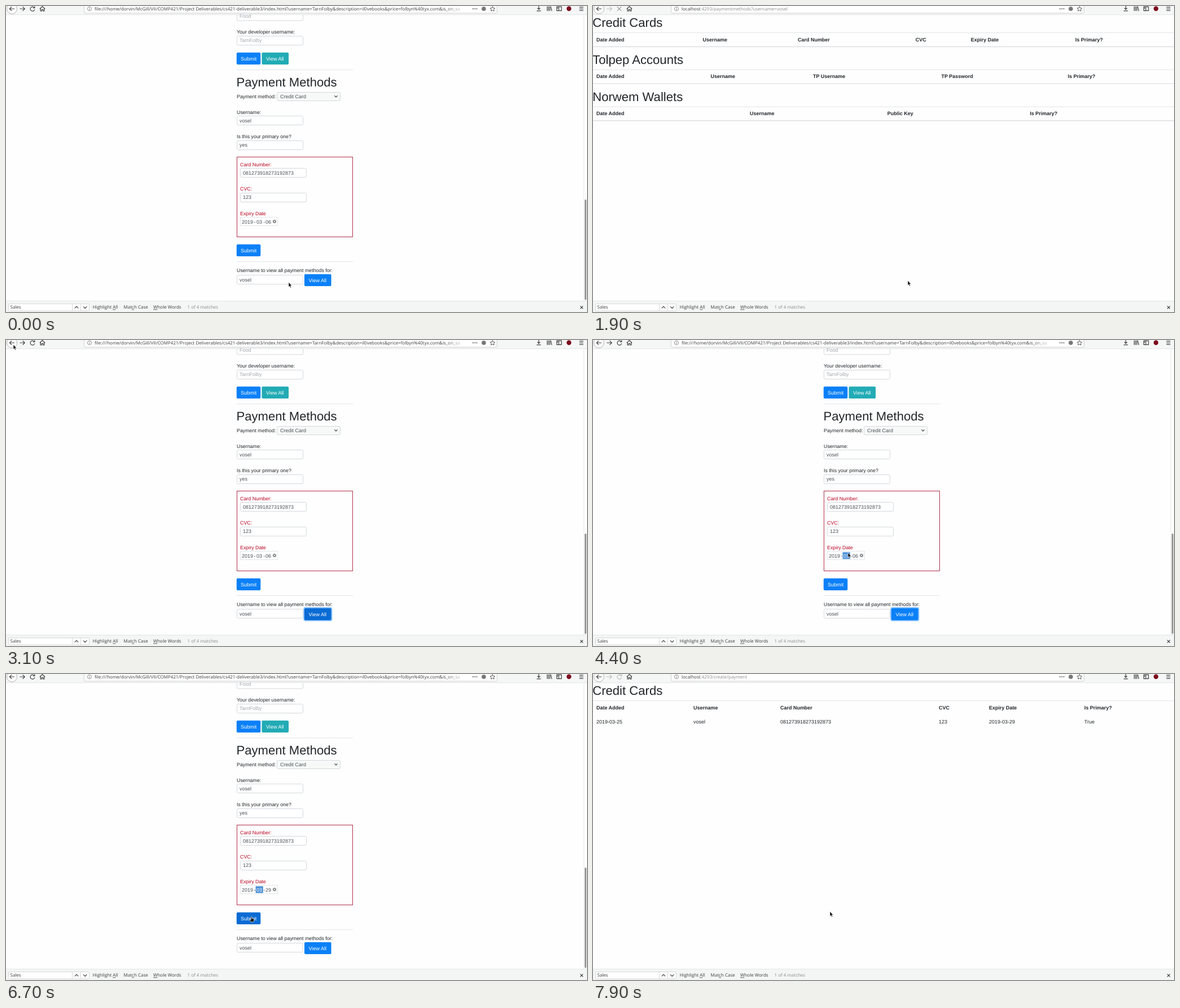
An HTML page that plays this animation: 1030 px wide and 544 px high, repeating every 8 s.

```html
<!DOCTYPE html>
<html lang="en">
<head>
<meta charset="utf-8">
<title>Payment methods</title>
<style>
html, body { margin: 0; width: 100%; height: 100%; overflow: hidden; background: #fefefe; }
svg { display: block; font-family: "Liberation Sans", Arial, sans-serif; text-rendering: geometricPrecision; }
text { font-size: 8.85px; fill: #212529; white-space: pre; }
.h1 { font-size: 22.1px; }
.val text { font-size: 9px; fill: #495057; }
.val .dim { fill: #a3a8ad; }
.btn { font-size: 9.05px; fill: #fff; }
.red text { fill: #b8001f; }
.th text { font-size: 8.97px; font-weight: bold; }
.td text { font-size: 9px; }
.ui text { font: 8px "Open Sans", "Noto Sans", sans-serif; fill: #3c3c3c; }
.ui .soft { fill: #8b8b8b; }
.u { text-decoration: underline; }
.field rect { fill: #fff; stroke: #d3d8dd; rx: 2px; }
.line { stroke: #e3e5e7; }
.bold { stroke: #d5d9dc; stroke-width: 1.2; }
.icon { fill: none; stroke: #3f3f40; stroke-width: 1.2; }
.pale { stroke: #bcbcbc; }
.cal text { font: 6.25px "Open Sans", "Noto Sans", sans-serif; text-anchor: middle; fill: #2e3436; }
.cal .month { font-size: 7px; }
.cal .name { fill: #8d8d8d; }
.cal .end { fill: #b5121f; }
.cal .out { fill: #a3a3a3; }
.cal .end.out { fill: #b39a9a; }
.cal .end.name { fill: #c07c80; }
.cal .today { font-weight: bold; }

.run, .cal .old, .cal .new { animation: 8s step-end infinite; }
.form { animation-name: form; }
.list { animation-name: list; }
.result { animation-name: result; }
.ready { animation-name: ready; }
.stop { animation-name: stop; }
.idle { animation-name: idle; }
.view { animation-name: view; }
.view-ring { animation-name: view-ring; }
.send { animation-name: send; }
.send-ring { animation-name: send-ring; }
.marked { animation-name: marked; }
.day-a { animation-name: day-a; }
.day-b { animation-name: day-b; }
.cal { animation-name: cal; }
.pick { animation-name: pick; }
.cal .old { animation-name: old; }
.cal .new { animation-name: new; }
.arrow { animation-name: arrow; }
.hand { animation-name: hand; }
.cursor { animation-name: cursor; }

@keyframes form { 0%, 37.5% { visibility: visible } 22.5%, 92.5%, 100% { visibility: hidden } }
@keyframes list { 0%, 37.5%, 100% { visibility: hidden } 22.5% { visibility: visible } }
@keyframes result { 0%, 100% { visibility: hidden } 92.5% { visibility: visible } }
@keyframes ready { 0%, 33.75% { visibility: visible } 21.25%, 90%, 100% { visibility: hidden } }
@keyframes stop { 0%, 26.25%, 93.75%, 100% { visibility: hidden } 21.25%, 90% { visibility: visible } }
@keyframes idle { 0%, 33.75% { visibility: hidden } 26.25%, 93.75%, 100% { visibility: visible } }
@keyframes view { 0%, 40%, 100% { fill: #0b80f7 } 17.5% { fill: #0a6bd4 } }
@keyframes view-ring { 0%, 56.25%, 100% { opacity: 0 } 21.25% { opacity: 1 } }
@keyframes send { 0%, 100% { fill: #0b80f7 } 83.75% { fill: #0a6bd4 } }
@keyframes send-ring { 0%, 100% { opacity: 0 } 90% { opacity: 1 } }
@keyframes marked { 0%, 100% { opacity: 0 } 55% { opacity: 1 } }
@keyframes day-a { 0% { opacity: 1 } 78.75%, 100% { opacity: 0 } }
@keyframes day-b { 0% { opacity: 0 } 78.75%, 100% { opacity: 1 } }
@keyframes cal { 0%, 78.75%, 100% { visibility: hidden } 56.25% { visibility: visible } }
@keyframes pick { 0% { transform: translate(479.2px, 448.4px) } 73.75%, 100% { transform: translate(515.9px, 490px) } }
@keyframes old { 0% { fill: #fff } 73.75%, 100% { fill: #2e3436 } }
@keyframes new { 0% { fill: #2e3436 } 73.75%, 100% { fill: #fff } }
@keyframes arrow { 0%, 22.5%, 92.5%, 100% { visibility: visible } 17.5%, 83.75% { visibility: hidden } }
@keyframes hand { 0%, 22.5%, 92.5%, 100% { visibility: hidden } 17.5%, 83.75% { visibility: visible } }
@keyframes cursor {
  0% { transform: translate(501px, 491px) }
  2.5% { transform: translate(494px, 407px) }
  6.25% { transform: translate(472px, 362px) }
  7.5% { transform: translate(440px, 304px) }
  8.75% { transform: translate(412px, 256px) }
  10% { transform: translate(421px, 235px) }
  11.25% { transform: translate(452px, 262px) }
  12.5% { transform: translate(500px, 330px) }
  13.75% { transform: translate(545px, 400px) }
  15% { transform: translate(575px, 450px) }
  16.25% { transform: translate(560px, 473px) }
  17.5% { transform: translate(558px, 488px) }
  25% { transform: translate(545px, 470px) }
  26.25% { transform: translate(470px, 380px) }
  27.5% { transform: translate(340px, 240px) }
  28.75% { transform: translate(190px, 120px) }
  30% { transform: translate(90px, 45px) }
  31.25% { transform: translate(44px, 18px) }
  32.5% { transform: translate(34px, 14px) }
  33.75% { transform: translate(25px, 10px) }
  36.25% { transform: translate(13px, 8px) }
  40% { transform: translate(190px, 130px) }
  41.25% { transform: translate(401px, 271px) }
  45% { transform: translate(470px, 310px) }
  46.25% { transform: translate(526px, 345px) }
  47.5% { transform: translate(490px, 362px) }
  48.75% { transform: translate(440px, 321px) }
  51.25% { transform: translate(450px, 368px) }
  53.75% { transform: translate(452px, 378px) }
  62.5% { transform: translate(461px, 398px) }
  63.75% { transform: translate(482px, 430px) }
  65% { transform: translate(508px, 464px) }
  66.25% { transform: translate(530px, 490px) }
  67.5% { transform: translate(544px, 506px) }
  68.75% { transform: translate(530px, 508px) }
  71.25% { transform: translate(527px, 500px) }
  81.25% { transform: translate(500px, 480px) }
  82.5% { transform: translate(455px, 447px) }
  83.75% { transform: translate(435px, 431px) }
  87.5% { transform: translate(433px, 436px) }
  93.75% { transform: translate(431px, 433px) }
  95% { transform: translate(428px, 429px) }
  96.25% { transform: translate(425px, 426px) }
  97.5% { transform: translate(422px, 424px) }
  98.75%, 100% { transform: translate(420px, 422px) }
}
</style>
</head>
<body>
<svg width="1030" height="544" viewBox="0 0 1030 544">
  <defs>
    <linearGradient id="fade"><stop offset="0" stop-color="#fff" stop-opacity="0"/><stop offset=".8" stop-color="#fff"/></linearGradient>
    <path id="reload" d="M50 2.8A3.9 3.9 0 1 0 50.8 6M50.8 .6V3.5H47.8"/>
    <path id="forward" d="M24.5 5H33M29.6 1.4 33.2 5 29.6 8.6"/>
  </defs>
  <rect width="1030" height="544" fill="#fefefe"/>

  <!-- browser toolbar -->
  <g class="ui">
    <rect width="1030" height="15" fill="#f5f6f6"/>
    <path class="line" d="M0 15.5H1030"/>
    <circle cx="10.5" cy="5" r="9" fill="#fcfcfc" stroke="#b4b4b4"/>
    <rect x="138.5" y="-5" width="732" height="17.8" rx="2" fill="#fff" stroke="#cfd0d1"/>
    <g class="icon">
      <path d="M15 5H6.5M10 1.4 6.4 5 10 8.6"/>
      <path d="M59.8 5 64.5 .8 69.2 5M61.2 4.5V9H63.3V6.3H65.7V9H67.8V4.5"/>
      <path d="M944.5 0V6M942 3.8 944.5 6.2 947 3.8M940.8 8.6H948.2"/>
      <path d="M959.5 .8V8.8M961.8 .8V8.8M964.1 .8V8.8M965.6 1 967.6 8.8"/>
      <path d="M976.5 1.3H984.7V8.4H976.5ZM980 1.3V8.4M977 3.6H979"/>
      <path d="M1016.5 2.2H1023.5M1016.5 5H1023.5M1016.5 7.8H1023.5"/>
      <path d="M862.5 .8 863.8 3.6 866.8 4 864.6 6.1 865.2 9 862.5 7.6 859.8 9 860.4 6.1 858.2 4 861.2 3.6Z" stroke-width=".9"/>
    </g>
    <circle cx="847" cy="5" r="3.8" fill="#777"/>
    <circle cx="998" cy="4.8" r="4.2" fill="#7d0b1c"/>
    <g fill="#666"><circle cx="828" cy="5" r="1.1"/><circle cx="831.3" cy="5" r="1.1"/><circle cx="834.6" cy="5" r="1.1"/></g>
    <circle cx="148" cy="5" r="3.6" fill="none" stroke="#777" stroke-width=".8"/>
    <path d="M148 4.3V7.2M148 2.6V3.5" stroke="#777"/>
    <use href="#reload" class="icon run ready"/>
    <path class="icon run stop" d="M43 1.3 50.2 8.7M50.2 1.3 43 8.7" style="stroke:#999"/>
    <use href="#reload" class="icon pale run idle"/>
  </g>

  <g class="run form">
    <use href="#forward" class="icon"/>
    <g class="ui">
      <text x="157" y="8">file:///home/dorvin/McGill/VII/COMP421/Project Deliverables/cs421-deliverable3/index.html?username=TarnFolby&amp;description=il0vebooks&amp;price=folbyn%40tyx.com&amp;is_on_sa</text>
      <rect x="780" y="0" width="42" height="12" fill="url(#fade)"/>
    </g>
    <g class="field">
      <path d="M409.5 16V24Q409.5 25.9 411.4 25.9H524.6Q526.5 25.9 526.5 24V16" fill="#fff" stroke="#d3d8dd"/>
      <rect x="409.5" y="53.5" width="117" height="16"/>
      <rect x="480.5" y="153.5" width="112" height="15" style="fill:#f6f9f7"/>
      <rect x="409.5" y="195.5" width="117" height="16"/>
      <rect x="409.5" y="239.5" width="117" height="16"/>
      <rect x="415.5" y="288.5" width="117" height="16"/>
      <rect x="415.5" y="332.5" width="117" height="16"/>
      <rect x="415.5" y="375.5" width="66" height="15" style="stroke:#e2e4e6;rx:0"/>
      <rect x="409.5" y="478.5" width="117" height="16"/>
    </g>
    <path class="icon" d="M582.4 159.3 585 162 587.6 159.3"/>
    <path class="line" d="M409 113.5H615M409 454.5H615"/>
    <rect x="409.5" y="268.5" width="205" height="142" fill="none" stroke="#b0304a"/>

    <text x="409" y="49.4">Your developer username:</text>
    <text class="h1" x="408.5" y="143">Payment Methods</text>
    <text x="409" y="164">Payment method:</text>
    <text x="409" y="192">Username:</text>
    <text x="409" y="235.4">Is this your primary one?</text>
    <text x="409" y="473.2">Username to view all payment methods for:</text>
    <g class="red">
      <text x="415" y="285">Card Number:</text>
      <text x="415" y="328.4">CVC:</text>
      <text x="415" y="372">Expiry Date</text>
    </g>
    <g class="val">
      <text class="dim" x="414" y="21.2">Food</text>
      <text class="dim" x="414" y="64.4">TarnFolby</text>
      <text x="486" y="164.2">Credit Card</text>
      <text x="414" y="207">vosel</text>
      <text x="414" y="250.4">yes</text>
      <text x="420" y="300">081273918273192873</text>
      <text x="420" y="343.4">123</text>
      <text x="414" y="490.2">vosel</text>
      <text x="418" y="386.5">2019</text>
      <text x="439.5" y="386.5">-</text>
      <text x="444" y="386.5">03</text>
      <text x="456.3" y="386.5">-</text>
      <text class="run day-a" x="460" y="386.5">06</text>
      <text class="run day-b" x="460" y="386.5">29</text>
    </g>
    <g class="run marked">
      <rect x="442.6" y="377.3" width="13.2" height="12" fill="#4a90d9"/>
      <text class="btn" x="444" y="386.5">03</text>
    </g>
    <circle cx="476" cy="383" r="3.1" fill="#858585"/>
    <path d="M474.7 381.7 477.3 384.3M477.3 381.7 474.7 384.3" stroke="#fff" stroke-width=".9"/>

    <g fill="none" stroke="#80bdff" stroke-width="1.8">
      <rect class="run view-ring" x="528.2" y="475.9" width="49.2" height="22.9" rx="2.6"/>
      <rect class="run send-ring" x="408" y="422.9" width="44.1" height="22.9" rx="2.6"/>
    </g>
    <rect x="408.8" y="82.8" width="42.5" height="21.3" rx="2" fill="#0b80f7"/>
    <rect x="453.5" y="82.8" width="47.6" height="21.3" rx="2" fill="#22abb5"/>
    <rect class="run send" x="408.8" y="423.7" width="42.5" height="21.3" rx="2"/>
    <rect class="run view" x="529" y="476.7" width="47.6" height="21.3" rx="2"/>
    <text class="btn" x="416" y="96.8">Submit</text>
    <text class="btn" x="461" y="96.8">View All</text>
    <text class="btn" x="416" y="437.6">Submit</text>
    <text class="btn" x="536.5" y="490.8">View All</text>

    <path d="M1024.5 16V524" stroke="#e9e9e9"/>
    <rect x="1025.8" y="344" width="3.2" height="178.5" rx="1.6" fill="#989898"/>
  </g>

  <g class="run cal">
    <path d="M417 398.5Q417 396.5 419 396.5H422L427 391.8 432 396.5H555.5Q557.5 396.5 557.5 398.5V520.5Q557.5 522.5 555.5 522.5H419Q417 522.5 417 520.5Z" fill="#fff" stroke="#d6d6d6"/>
    <rect x="457.5" y="403.5" width="59" height="12" rx="1.5" fill="#fff" stroke="#d8d8d8"/>
    <path class="icon" style="stroke:#777" d="M433 405.6 429.4 409.2 433 412.8M541.5 405.6 545.1 409.2 541.5 412.8M506.6 408.2 509 410.5 511.4 408.2"/>
    <text class="month" x="483.3" y="411.8">March 2019</text>
    <rect x="442.6" y="490" width="16.4" height="13" rx="1" fill="#d9dadb"/>
    <rect class="run pick" width="16.4" height="13" rx="1" fill="#4a90d9"/>
    <g id="days"></g>
  </g>

  <g class="run list">
    <use href="#forward" class="icon pale"/>
    <g class="ui"><text x="157" y="8">localhost<tspan class="soft">:4293/paymentmethods?username=vosel</tspan></text></g>
    <text class="h1" x="-.8" y="37.4">Credit Cards</text>
    <text class="h1" x="-.8" y="103">Tolpep Accounts</text>
    <text class="h1" x="-.8" y="168.7">Norwem Wallets</text>
    <path class="line" d="M0 47.5H1030M0 113.3H1030M0 179.2H1030"/>
    <path class="bold" d="M0 72.3H1030M0 138H1030M0 203.8H1030"/>
    <g class="th">
      <text x="6" y="63">Date Added</text><text x="194.5" y="63">Username</text><text x="363" y="63">Card Number</text>
      <text x="571.8" y="63">CVC</text><text x="669.8" y="63">Expiry Date</text><text x="855" y="63">Is Primary?</text>
      <text x="6" y="128.4">Date Added</text><text x="208.5" y="128.4">Username</text><text x="390" y="128.4">TP Username</text>
      <text x="617.5" y="128.4">TP Password</text><text x="841.7" y="128.4">Is Primary?</text>
      <text x="6" y="194.4">Date Added</text><text x="278" y="194.4">Username</text><text x="521.8" y="194.4">Public Key</text>
      <text x="774.4" y="194.4">Is Primary?</text>
    </g>
  </g>

  <g class="run result">
    <use href="#forward" class="icon pale"/>
    <g class="ui"><text x="157" y="8">localhost<tspan class="soft">:4293/create/payment</tspan></text></g>
    <text class="h1" x="-.8" y="37.4">Credit Cards</text>
    <path class="line" d="M0 47.5H1030"/>
    <g class="th">
      <text x="6" y="63">Date Added</text><text x="178" y="63">Username</text><text x="332" y="63">Card Number</text>
      <text x="613" y="63">CVC</text><text x="702" y="63">Expiry Date</text><text x="871" y="63">Is Primary?</text>
    </g>
    <g class="td">
      <text x="6" y="88">2019-03-25</text><text x="178" y="88">vosel</text><text x="332" y="88">081273918273192873</text>
      <text x="613" y="88">123</text><text x="702" y="88">2019-03-29</text><text x="871" y="88">True</text>
    </g>
  </g>

  <!-- find bar -->
  <g class="ui">
    <rect y="524.5" width="1030" height="20" fill="#f4f5f5"/>
    <path class="line" d="M0 524.5H1030"/>
    <rect x="4.5" y="529.5" width="143" height="12.5" rx="1.5" fill="#fff" stroke="#d6d7d8"/>
    <path d="M117.5 529.5V542M132.5 529.5V542" stroke="#d6d7d8"/>
    <path class="icon" d="M121.8 537.4 125 534.2 128.2 537.4M137 534.2 140.2 537.4 143.4 534.2M1018 533.3 1023 538.3M1023 533.3 1018 538.3"/>
    <text x="7.5" y="538.4">Sales</text>
    <text x="153.8" y="538.4">Highlight <tspan class="u">A</tspan>ll</text>
    <text x="208.6" y="538.4">Mat<tspan class="u">c</tspan>h Case</text>
    <text x="261" y="538.4"><tspan class="u">W</tspan>hole Words</text>
    <text class="soft" x="321.5" y="538.4">1 of 4 matches</text>
  </g>

  <g class="run cursor" stroke="#fff" stroke-width=".6" fill="#111">
    <path class="run arrow" d="M0 0V8.6L1.9 7 3.2 10 4.6 9.4 3.3 6.4H5.8Z"/>
    <path class="run hand" d="M-.9 .6Q0-.5 .9 .6V3.4L4 4.1Q4.8 4.4 4.8 5.3L4.2 9.8H-.8L-3 6.4Q-3.2 5.3-2.2 5.4L-.9 6.4Z"/>
  </g>
</svg>
<script>
const days = document.getElementById("days");

function put(label, col, y, ...marks) {
  const el = document.createElementNS("http://www.w3.org/2000/svg", "text");
  el.setAttribute("x", 432.3 + col * 18.35);
  el.setAttribute("y", y);
  if (col % 6 === 0) marks.push("end");
  el.setAttribute("class", marks.join(" "));
  el.textContent = label;
  days.append(el);
}

["Sun", "Mon", "Tue", "Wed", "Thu", "Fri", "Sat"].forEach((name, col) => put(name + ".", col, 429.3, "name"));

const special = { 6: "old", 25: "today", 29: "new" };
for (let i = 0; i < 42; i++) {
  const date = new Date(2019, 1, 24 + i);
  const day = date.getDate();
  const mark = date.getMonth() === 2 ? special[day] || "in" : "out";
  put(day, i % 7, 443.2 + Math.floor(i / 7) * 13.9, mark);
}
</script>
</body>
</html>
```
